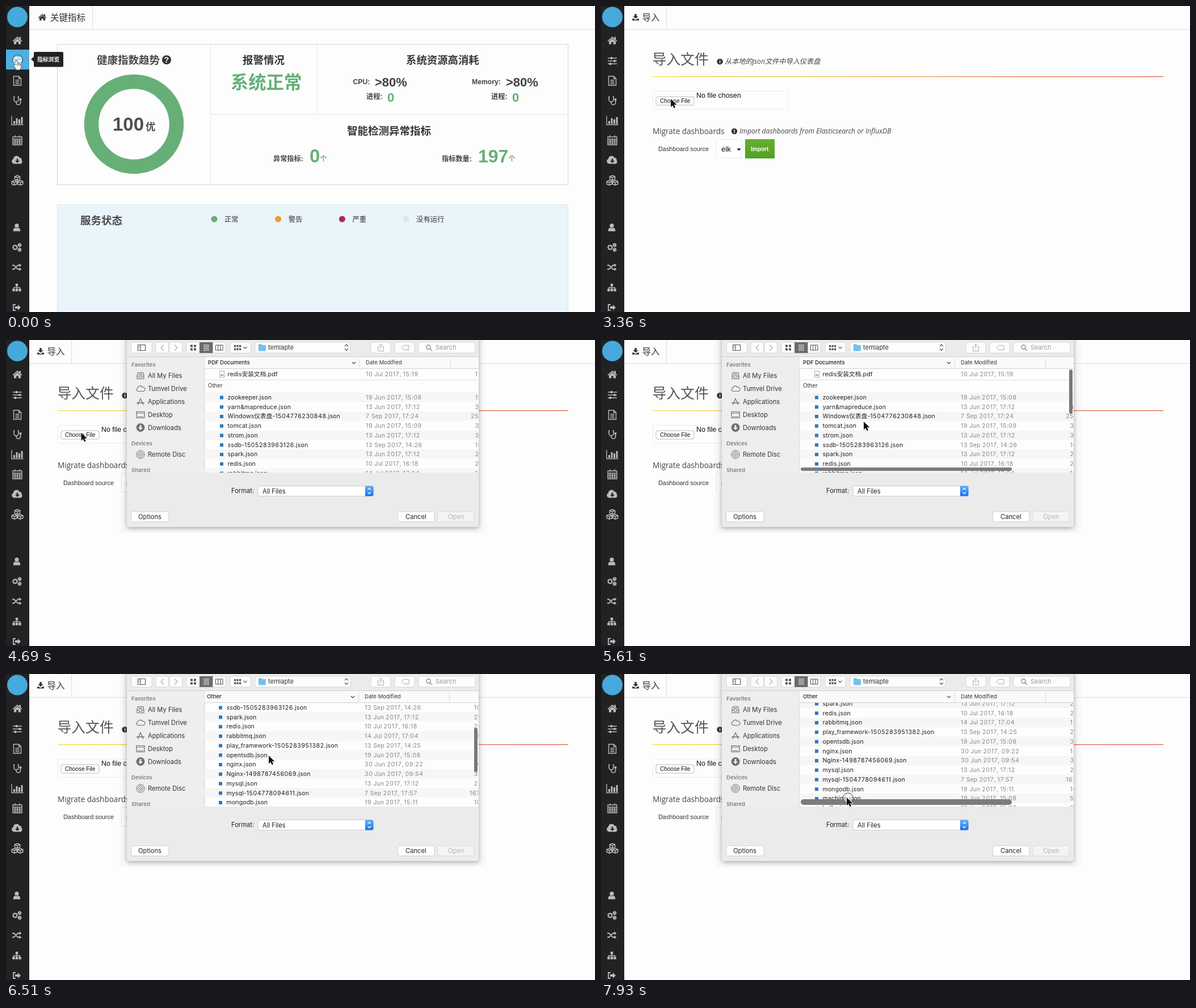
These frames come from a looping animation (1038x540 px, 7.99 s). An HTML page with a canvas:

```html
<!DOCTYPE html>
<html lang="zh">
<head>
<meta charset="utf-8">
<title>指标浏览</title>
<style>
html, body { margin: 0; width: 100%; height: 100%; overflow: hidden; background: #fdfdfd; }
canvas { display: block; width: 1038px; height: 540px; }
</style>
</head>
<body>
<canvas id="stage"></canvas>
<script>
const LOOP = 7990;
const canvas = document.getElementById('stage');
const c = canvas.getContext('2d');
const ratio = window.devicePixelRatio || 1;
canvas.width = 1038 * ratio;
canvas.height = 540 * ratio;

const CJK = '"Noto Sans CJK SC", "Noto Sans CJK JP", "Noto Sans CJK", sans-serif';
const SANS = '"Liberation Sans", ' + CJK;
const OPEN = '"Open Sans", ' + CJK;
const UI = 'Inter, ' + CJK;
const GREEN = '#66b078', BLUE = '#4fafe0', DARK = '#222', INK = '#444';

// ---- helpers ----
const smooth = p => p * p * (3 - 2 * p);
const mix = (a, b, p) => a + (b - a) * p;

// Progress 0..1 in n equal jumps, first at a and last at b.
function stepped(t, a, b, n) {
  if (t < a) return 0;
  return Math.min(n, Math.floor((t - a) / (b - a) * (n - 1) + 1e-6) + 1) / n;
}

// y is the visual middle of the line.
function text(s, x, y, size, color, font = SANS, style = '') {
  c.font = `${style} ${size}px ${font}`;
  c.fillStyle = color;
  c.fillText(s, x, y + size * 0.36);
}
const bold = (s, x, y, size, color = INK) => text(s, x, y, size, color, SANS, 'bold');

// Interface text with digits set wider than letters.
function figures(s, x, y, color) {
  for (const part of s.split(/(\d+)/)) {
    c.letterSpacing = /\d/.test(part) ? '0.6px' : '0.1px';
    text(part, x, y, 10.6, color, UI);
    x += c.measureText(part).width;
  }
  c.letterSpacing = '0px';
}

function rect(x, y, w, h, fill) {
  c.fillStyle = fill;
  c.fillRect(x, y, w, h);
}
function frame(x, y, w, h, color) {
  c.strokeStyle = color;
  c.lineWidth = 1;
  c.strokeRect(x + 0.5, y + 0.5, w - 1, h - 1);
}
function round(x, y, w, h, r, fill, line) {
  c.beginPath();
  c.roundRect(x, y, w, h, r);
  c.fillStyle = fill;
  c.fill();
  if (line) {
    c.strokeStyle = line;
    c.lineWidth = 0.8;
    c.stroke();
  }
}
function disc(x, y, r, fill) {
  c.beginPath();
  c.arc(x, y, r, 0, 7);
  c.fillStyle = fill;
  c.fill();
}
function vertical(y0, y1, from, to) {
  const g = c.createLinearGradient(0, y0, 0, y1);
  g.addColorStop(0, from);
  g.addColorStop(1, to);
  return g;
}

// ---- icons: f filled, s stroked, w stroke width, cut knocked out ----
const ring = (x, y, r) => `M${x - r} ${y}a${r} ${r} 0 1 0 ${2 * r} 0a${r} ${r} 0 1 0 ${-2 * r} 0`;
const cube = (x, y) => `M${x} ${y - 4.5}l4.6 2v4.6l-4.6 2-4.6-2v-4.6Zm-4.6 2l4.6 2 4.6-2m-4.6 2v4.6`;
function gear(x, y, r) {
  let d = ring(x, y, r);
  for (let a = 0; a < 8; a++) {
    const u = Math.cos(a * Math.PI / 4), v = Math.sin(a * Math.PI / 4);
    d += `M${x + u * r} ${y + v * r}L${x + u * (r + 2)} ${y + v * (r + 2)}`;
  }
  return d;
}
const ICONS = {
  home: { f: 'M0-7 8.5.5 7.4 1.8 0-4.6-7.4 1.8-8.5.5ZM3.5-6.5H6V-1.6L3.5-3.8ZM-6 1.6 0-3.4 6 1.6V6.5H1.8V2.5H-1.8V6.5H-6Z' },
  sliders: { s: 'M-8-5H8M-8 0H8M-8 5H8', w: 1.4, f: 'M-3-7h3v4h-3ZM2.5-2h3v4h-3ZM-5 3h3v4h-3Z' },
  file: { s: 'M-6.5-8H2.5L6.5-4V8H-6.5ZM2.5-8V-4H6.5M-3.5-1H3.5M-3.5 2H3.5M-3.5 5H3.5', w: 1.4 },
  scope: { s: 'M-4.5-7H-6V-2A4 4 0 0 0 2-2V-7H.5M-2 2V3.5A3.7 3.7 0 0 0 5.5 3.5V-.5', w: 1.6, f: ring(5.5, -2, 2.1) },
  bars: { s: 'M-10-8V7.5H10.5', w: 1.3, f: 'M-7 1h3v5h-3ZM-2.5-4h3V6h-3ZM2-2h3v8h-3ZM6.5-6h3V6h-3Z' },
  calendar: { s: 'M-8-6H8V8H-8ZM-8-2H8M-8 1.5H8M-8 4.8H8M-4-2V8M0-2V8M4-2V8M-4-9v4M4-9v4', w: 1.3 },
  cloud: { f: 'M-5.5 6.5a4.5 4.5 0 0 1-1.6-8.6a5.6 5.6 0 0 1 10.6-2.2a3.6 3.6 0 0 1 4 4.4a4 4 0 0 1-1.5 6.4Z', cut: 'M-1.3-2.5h2.6V1H4L0 5-4 1h2.7Z' },
  cubes: { s: cube(0, -4.5) + cube(-5.2, 4.2) + cube(5.2, 4.2), w: 1.5 },
  user: { f: ring(0, -3.3, 3.6) + 'M-6.2 6.5C-6.5 1.5-4 .2-2.8.2Q0 2 2.8.2C4 .2 6.5 1.5 6.2 6.5Z' },
  cogs: { s: gear(-3, 0, 3.1) + gear(5, -4.2, 1.6) + gear(5, 4.2, 1.6), w: 1.6 },
  shuffle: { s: 'M-8-3.5H-5L2 3.5H5M-8 3.5H-5L2-3.5H5', w: 1.9, f: 'M4.5-6.5 8.5-3.5 4.5-.5ZM4.5.5 8.5 3.5 4.5 6.5Z' },
  tree: { s: 'M0-3V3M-5.5 3V0H5.5V3', w: 1.3, f: 'M-2.2-7h4.4v4.4h-4.4ZM-7.7 2h4.4v4.4h-4.4ZM-2.2 2h4.4v4.4h-4.4ZM3.3 2h4.4v4.4H3.3Z' },
  exit: { s: 'M-2-5H-6V5H-2', w: 1.8, f: 'M-3-2H2V-5L7 0 2 5V2H-3Z' },
  save: { f: 'M-2-7h4v4.5h3.5L0 3-5.5-2.5H-2ZM-7 2.5h3l3 2.5h2l3-2.5h3v4H-7Z' },
  files: { s: 'M-6 5.5V0L-4.5-5.5H4.5L6 0V5.5ZM-6 1H-3L-2 3H2L3 1H6M-3-3H3M-3.5-1H3.5', w: 1.1 },
  drive: { s: 'M-4.5 4.5a3.3 3.3 0 0 1-.5-6a4.5 4.5 0 0 1 8.2-1.2a3.6 3.6 0 0 1 2 7.2Z', w: 1.1 },
  apps: { s: 'M-5 5.5 0-5.5 5 5.5M-7 2H7', w: 1.3 },
  desktop: { s: 'M-7-5.5H7V5.5H-7ZM-7-3H7M-5 3.5H5', w: 1.2 },
  down: { f: ring(0, 0, 7.4), cut: 'M-1.4-4.5h2.8V0H4.2L0 4.5-4.2 0h2.8Z' },
  optical: { s: ring(0, 0, 7.2) + ring(0, 0, 4.6) + ring(0, 0, 2), w: 1 }
};
function icon(name, x, y, color, scale = 1, back = DARK) {
  const d = ICONS[name];
  c.save();
  c.translate(x, y);
  c.scale(scale, scale);
  c.fillStyle = c.strokeStyle = color;
  c.lineWidth = d.w || 1;
  if (d.s) c.stroke(new Path2D(d.s));
  if (d.f) c.fill(new Path2D(d.f));
  if (d.cut) {
    c.fillStyle = back;
    c.fill(new Path2D(d.cut));
  }
  c.restore();
}
function stroke(d, color, w = 1.2) {
  c.strokeStyle = color;
  c.lineWidth = w;
  c.stroke(new Path2D(d));
}
function badge(s, x, y, r) {
  disc(x, y, r, '#333');
  bold(s, x - r * (s === 'i' ? 0.25 : 0.6), y, r * 1.85, '#fff');
}

// ---- side bar ----
const SIDE = [['home', 61], ['sliders', 97], ['file', 132], ['scope', 167], ['bars', 202], ['calendar', 237],
  ['cloud', 272], ['cubes', 308], ['user', 391], ['cogs', 426], ['shuffle', 461], ['tree', 497], ['exit', 532]];
function sidebar(active) {
  rect(0, 0, 41, 540, DARK);
  if (active) rect(0, 77, 41, 35, BLUE);
  disc(20, 19.5, 18, '#45a9dc');
  for (const [name, y] of SIDE) {
    icon(name, y > 380 ? 19 : 20, y, active && name === 'sliders' ? '#fff' : '#bcbcbc');
  }
}
function tab(name, label, x, lx, edge) {
  rect(41, 0, 997, 540, '#fdfdfd');
  rect(41, 41, 997, 1, '#dcdcdc');
  rect(edge, 0, 1, 41, '#dcdcdc');
  icon(name, x, 20, '#333', 0.85);
  text(label, lx, 20, 15.5, '#333');
}

// ---- dashboard ----
function usage(label, x, px, vx) {
  bold(label, x, 134, 12.2);
  bold('>80%', px, 134.5, 22);
  bold('进程:', vx - 37, 160, 12.2);
  bold('0', vx, 161, 22, GREEN);
}
function dashboard() {
  tab('home', '关键指标', 64, 78, 152);
  frame(90, 67, 901, 249, '#d6d6d6');
  rect(360, 68, 1, 247, '#e2e2e2');
  rect(548, 68, 1, 123, '#e2e2e2');
  rect(361, 191, 629, 1, '#e2e2e2');
  bold('健康指数趋势', 160, 95, 18.5, '#4a4a4a');
  badge('?', 283, 95, 8);
  c.beginPath();
  c.arc(225.5, 208.5, 75, 0, 7);
  c.strokeStyle = GREEN;
  c.lineWidth = 25.5;
  c.stroke();
  bold('100', 188, 208, 33, '#4f4f4f');
  bold('优', 246, 213, 17.5, '#4f4f4f');
  bold('报警情况', 417, 95, 18.5, '#33383c');
  bold('系统正常', 396, 134.5, 31.3, GREEN);
  bold('系统资源高消耗', 705, 95, 18.4, '#33383c');
  usage('CPU:', 611.5, 650, 672);
  usage('Memory:', 821, 881, 892);
  bold('智能检测异常指标', 601, 220, 18.5, '#33383c');
  bold('异常指标:', 471, 270, 12.2);
  bold('0', 535, 264, 33, GREEN);
  bold('个', 553.5, 270, 12, GREEN);
  bold('指标数量:', 768, 270, 12.2);
  bold('197', 832, 264, 32, GREEN);
  bold('个', 885.5, 270, 12, GREEN);
  rect(90, 350, 901, 189, '#e9f4fb');
  frame(90, 350, 901, 200, '#dfe8ec');
  bold('服务状态', 131, 378, 18.5, '#4a4a4a');
  [['正常', GREEN], ['警告', '#f09a33'], ['严重', '#a92d4b'], ['没有运行', '#dce5ea']].forEach(([s, color], i) => {
    disc(367 + i * 112.7, 376, 5.5, color);
    text(s, 385 + i * 112.7, 377, 12.3, '#333');
  });
}
function tooltip() {
  round(49, 81, 52, 26.5, 2, DARK);
  c.fill(new Path2D('M44 94l5-4.5v9Z'));
  bold('指标浏览', 55, 94, 9.8, '#fff');
}
const MENU = ['+新建', '导入', 'elk', 'elk_test', 'hadoop', 'hbase-test-ntp', 'opentsdb', '新的仪表盘'];
function menu(hover) {
  rect(41, 0, 132, 41, DARK);
  rect(41, 41, 132, 499, '#999');
  if (hover) rect(41, 89, 132, 48, BLUE);
  icon('sliders', 69, 22, '#bcbcbc');
  bold('指标浏览', 97, 22, 12.3, '#fff');
  MENU.forEach((s, i) => bold(s, 51, 65 + i * 47.6, 12.1, '#fff'));
}

// ---- import page ----
function importPage(pressed) {
  tab('save', '导入', 61, 72.5, 115);
  text('导入文件', 90.5, 94, 24.8, '#555', OPEN);
  badge('i', 209.5, 98, 5.2);
  text('从本地的json文件中导入仪表盘', 218, 98, 12.2, INK, OPEN, 'italic');
  const g = c.createLinearGradient(91, 0, 991, 0);
  g.addColorStop(0, '#f0dc3c');
  g.addColorStop(0.45, '#f0a53c');
  g.addColorStop(0.7, '#e8703f');
  g.addColorStop(1, '#e2583c');
  rect(91, 124, 900, 1.2, g);
  c.beginPath();
  c.roundRect(91.5, 150.5, 239, 32, 3);
  c.strokeStyle = '#ebebeb';
  c.lineWidth = 1;
  c.stroke();
  round(97, 160, 67, 15, 3, pressed ? vertical(160, 175, '#5aa6f7', '#0f6df0') : '#fff', pressed ? '#2a62c8' : '#a8a8a8');
  text('Choose File', 104, 167.5, 10, '#111');
  text('No file chosen', 168, 158, 12.4, '#111');
  text('Migrate dashboards', 91, 221, 13.55, INK, OPEN);
  badge('i', 235, 221, 5.2);
  text('Import dashboards from Elasticsearch or InfluxDB', 244, 221, 12.15, INK, OPEN, 'italic');
  text('Dashboard source', 101, 252, 10.9, '#333');
  rect(203, 235, 45, 34, '#fff');
  frame(203, 235, 45, 34, '#ebebeb');
  text('elk', 212, 252, 13.3, '#111');
  c.fillStyle = '#111';
  c.fill(new Path2D('M239.5 251.5h7l-3.5 4Z'));
  rect(254, 235, 52, 34, vertical(235, 269, '#63b030', '#52a026'));
  bold('Import', 264, 252.5, 10.1, '#fff');
}

// ---- file dialog ----
const FILES = `zookeeper.json|19 Jun 2017, 15:08|15
yarn&mapreduce.json|13 Jun 2017, 17:12|34
Windows仪表盘-1504776230848.json|7 Sep 2017, 17:24|251
tomcat.json|19 Jun 2017, 15:09|31
strom.json|13 Jun 2017, 17:12|36
ssdb-1505283963126.json|13 Sep 2017, 14:26|10
spark.json|13 Jun 2017, 17:12|25
redis.json|10 Jul 2017, 16:18|20
rabbitmq.json|14 Jul 2017, 17:04|14
play_framework-1505283951382.json|13 Sep 2017, 14:25|23
opentsdb.json|19 Jun 2017, 15:08|34
nginx.json|30 Jun 2017, 09:22|14
Nginx-1498787456069.json|30 Jun 2017, 09:54|30
mysql.json|13 Jun 2017, 17:12|24
mysql-1504778094611.json|7 Sep 2017, 17:57|167
mongodb.json|19 Jun 2017, 15:11|10
machine.json|19 Jun 2017, 15:08|52
kafka.json|19 Jun 2017, 15:08|24`.split('\n').map(row => row.split('|'));
const PLACES = [['files', 'All My Files', 63], ['drive', 'Tumvel Drive', 86], ['apps', 'Applications', 109],
  ['desktop', 'Desktop', 132], ['down', 'Downloads', 154.5], ['optical', 'Remote Disc', 202]];

function fileRow([name, date, size], y, x, pdf) {
  if (pdf) {
    rect(x + 27, y - 5, 8, 11, '#fff');
    frame(x + 26, y - 6, 9, 12, '#aaa');
    rect(x + 28, y, 5, 3, '#9ab');
  } else {
    rect(x + 27, y - 2.5, 6, 6, '#2f79bd');
  }
  figures(name, x + 40.5, y, '#222');
  figures(date, x + 284, y, '#8a8a8a');
  figures(size, x + (size.length > 2 ? 469 : 476.5), y, '#8a8a8a');
}
function fileList(t) {
  const first = Math.max(0, (stepped(t, 5610, 6370, 12) * 12 - 1) / 11);
  const scroll = smooth(first) * 121 + stepped(t, 6430, 7180, 12) * 28.5;
  const x = 350 - (t >= 5800 && t < 7180 ? 2 : 0);
  c.save();
  c.beginPath();
  c.rect(350, 30, 482.5, 204);
  c.clip();
  FILES.forEach((row, i) => {
    const y = 101 + i * 16.75 - scroll;
    if (y < 35 || y > 250) return;
    if (i % 2 === 0) rect(350, y - 8.4, 483, 16.75, '#f6f6f6');
    fileRow(row, y, x);
  });
  const top = 60.5 - scroll;
  fileRow(['redis安装文档.pdf', '10 Jul 2017, 15:19', '12'], top, x, true);
  rect(350, top + 9.5, 483, 1, '#e0e0e0');
  text('Other', x + 6, top + 20.5, 9.7, '#333', UI);
  rect(350, 30, 483, 20, '#fafafa');
  rect(350, 50, 483, 1, '#d2d2d2');
  text(scroll > 20 ? 'Other' : 'PDF Documents', x + 6, 40, 9.6, '#222', UI, '500');
  text('Date Modified', x + 284, 40, 9.6, '#333', UI);
  rect(x + 273, 32, 1, 17, '#d8d8d8');
  rect(x + 433, 32, 1, 17, '#d8d8d8');
  stroke(`M${x + 260} 39l3 3 3-3`, '#444');
  if (t >= 5610 && t < 7180) round(825, 52 + scroll * 0.343, 6, 78, 3, '#787878');
  if ((t >= 5610 && t < 6000) || (t >= 7180 && t < 7600)) round(352, 225, 372, 6, 3, '#7c7c7c');
  if (t >= 7600) round(352, 221, 372, 10, 5, '#7c7c7c');
  c.restore();
}
function toolbar(active) {
  const ink = active ? '#555' : '#aaa', face = active ? '#fdfdfd' : '#f4f4f4', line = '#cfcfcf';
  for (const [x, w] of [[221, 36], [264, 22.5], [288, 22.5], [318, 69], [395, 36], [439, 168], [643, 35], [685, 35], [727, 100]]) {
    round(x, 4, w, 19, 3, face, line);
  }
  rect(341, 4, 23.5, 19, active ? '#6b6b6b' : '#ccc');
  stroke('M232.5 8.5h13v10h-13ZM237 8.5v10M234 11h1.5M234 13.5h1.5', ink, 1.1);
  stroke('M278 8.5l-5 5 5 5M297 8.5l5 5-5 5', '#b0b0b0');
  c.fillStyle = ink;
  for (const dx of [0, 6]) for (const dy of [0, 6]) c.fillRect(325 + dx, 8.5 + dy, 4, 4);
  for (let i = 0; i < 3; i++) for (let j = 0; j < 2; j++) c.fillRect(402 + i * 4.5, 9 + j * 5.5, 3.2, 3.5);
  stroke('M348 9h10M348 12h10M348 15h10M348 18h10', '#fff', 1.1);
  stroke('M369.5 9h12.5v9h-12.5ZM373.7 9v9M377.9 9v9M418.5 12l3 3 3-3', ink, 1.1);
  stroke('M597 11l3-3.2 3 3.2M597 15.5l3 3.2 3-3.2', ink);
  stroke('M658 11.5h-2.5v8h10v-8H663M660.5 16V7M658 9.5l2.5-2.5 2.5 2.5', '#aaa', 1);
  stroke('M697 13.5l4-4h9v8h-9Z', '#aaa', 1);
  stroke(ring(744.5, 12.5, 3.6) + 'M747 15.2l4 4', '#777');
  text('Search', 757, 13.5, 11, '#999', UI);
  round(445, 7.5, 6, 4, 1, '#62b4e2');
  round(445, 9, 13, 10.5, 1, '#72c1ec');
  text('temlapte', 462, 13.5, 11, active ? '#333' : '#999', UI);
}
function button(s, x, w, tx, ink, on) {
  round(x, 303, w, 18, 3, on ? '#fff' : '#f4f4f4', on ? '#c6c6c6' : '#d6d6d6');
  text(s, tx, 312, 11.2, ink, UI);
}
function dialog(t) {
  if (t < 4160) return;
  const now = 4160 + Math.floor((t - 4160) / 60) * 60;
  const p = 0.5 - 0.5 * Math.cos(Math.PI * Math.min(1, (now - 4087) / 370));
  const active = t >= 4690;
  c.save();
  c.translate(0, 330 * (p - 1));
  rect(200, -10, 646, 350, 'rgba(0,0,0,.015)');
  c.shadowColor = 'rgba(0,0,0,.35)';
  c.shadowBlur = 9 * ratio;
  c.shadowOffsetY = 2 * ratio;
  round(213, -10, 620, 340, [0, 0, 4, 4], active ? '#ebebeb' : '#e8e8e8');
  c.shadowColor = 'transparent';
  rect(213, 29, 620, 1, '#cfcfcf');
  rect(213, 30, 137, 204, '#eee');
  rect(350, 30, 483, 204, active ? '#fdfdfd' : '#f9f9f9');
  rect(349.5, 30, 1, 204, '#d4d4d4');
  toolbar(active);
  c.save();
  c.beginPath();
  c.rect(213, 30, 137, 204);
  c.clip();
  for (const [s, y] of [['Favorites', 43.5], ['Devices', 182.5], ['Shared', 230]]) text(s, 221, y, 9.6, '#808080', UI, '600');
  for (const [name, s, y] of PLACES) {
    icon(name, 237, y, '#6e6e6e', 1, '#eee');
    text(s, 250, y, 11.2, '#333', UI);
  }
  c.restore();
  if (active) fileList(t);
  text('Format:', 397, 266, 11.2, '#222', UI);
  round(444, 257.5, 203.5, 18, 3, '#fff', '#c0c0c0');
  text('All Files', 452, 266.5, 11.2, '#222', UI);
  if (active) round(633, 257.5, 14.5, 18, [0, 3, 3, 0], vertical(257, 275, '#65aef8', '#1873f5'));
  stroke('M637.5 264.5l2.8-3 2.8 3M637.5 268.5l2.8 3 2.8-3', active ? '#fff' : '#444');
  button('Options', 220.5, 66.5, 233, active ? '#222' : '#b4b4b4', active);
  button('Cancel', 690.5, 64.5, 704, active ? '#222' : '#999', active);
  button('Open', 761, 64, 779, '#b4b4b4', false);
  c.restore();
}

// ---- pointer ----
const MOVES = [[1460, 1670, 5, 65, 108], [3040, 3360, 6, 123, 164], [4690, 5250, 10, 463, 144],
  [7060, 7180, 3, 460, 176], [7240, 7700, 9, 433, 218]];
const CLICKS = [[0, 60], [1130, 1160], [2300, 2360], [3780, 3840], [7930, LOOP]];
function pointerAt(t) {
  let x = 18, y = 97;
  for (const [a, b, n, tx, ty] of MOVES) {
    const p = smooth(stepped(t, a, b, n));
    x = mix(x, tx, p);
    y = mix(y, ty, p);
  }
  return [x, y];
}
const ARROW = new Path2D('M0 0V14.2L3.3 11.2 5.6 16.2 8 15.1 5.8 10.3H10.4Z');
const HAND = new Path2D('M-1.6 1Q-1.4-.6 0-.6T1.6 1V4.6Q4 3.8 4.4 5.4Q6.6 4.8 6.8 6.4Q8.8 6 9 8Q9 11 7.4 13.2V15.6H-.4V13.8L-4.6 8.6Q-4.6 6.6-2.6 7.2L-1.6 8.4Z');
function pointer(t, x, y) {
  const hand = t < 2890;
  if (CLICKS.some(([a, b]) => t >= a && t < b)) {
    disc(x + 2.5, y + (hand ? -1.5 : 1), 9, 'rgba(255,255,255,.45)');
    c.strokeStyle = '#333';
    c.lineWidth = 1;
    c.stroke();
  }
  c.save();
  c.translate(x, y);
  c.lineJoin = 'round';
  c.lineWidth = hand ? 1.1 : 1.6;
  c.strokeStyle = hand ? '#111' : '#fff';
  c.fillStyle = hand ? '#fff' : '#111';
  c.stroke(hand ? HAND : ARROW);
  c.fill(hand ? HAND : ARROW);
  if (hand) stroke('M1.6 5V8M4.3 6V8.4M6.7 7V9', '#111', 0.9);
  c.restore();
}

function draw(t) {
  const [x, y] = pointerAt(t);
  c.setTransform(ratio, 0, 0, ratio, 0, 0);
  if (t < 2360) dashboard();
  else importPage(t >= 3780 && t < 4690);
  sidebar(x < 41);
  if (t < 1160) tooltip();
  else if (t < 2360) menu(x > 41);
  dialog(t);
  pointer(t, x, y);
}

const start = performance.now();
function tick() {
  draw((performance.now() - start) % LOOP);
  requestAnimationFrame(tick);
}
tick();
</script>
</body>
</html>
```
